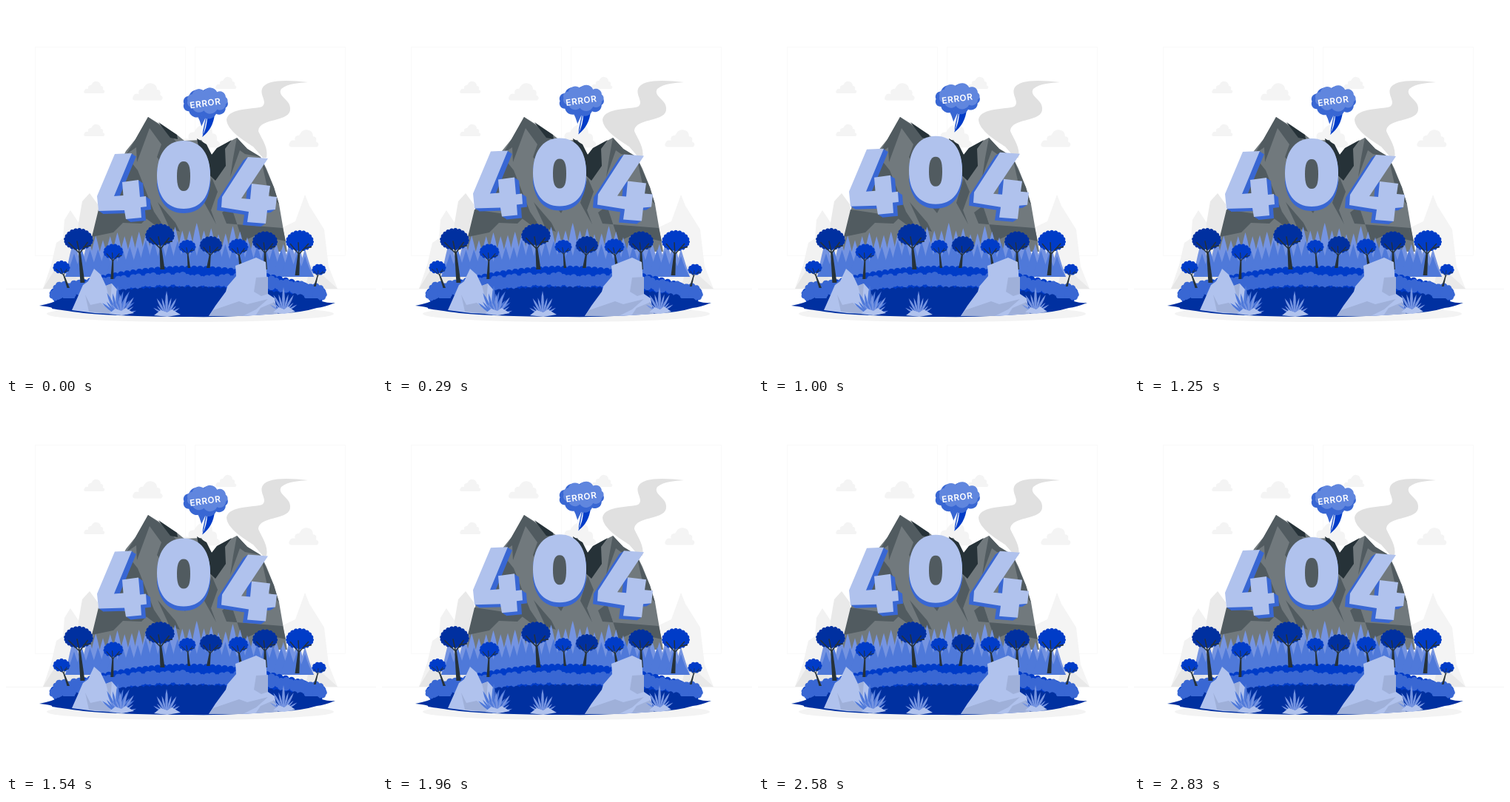
Animation of 500 by 500 pixels, one loop 2870 ms. Source, as an HTML page:

```html
<!DOCTYPE html>
<html lang="en">
<head>
<meta charset="utf-8">
<title>404</title>
<style>
html, body { margin: 0; width: 100%; height: 100%; overflow: hidden; background: #fff }
svg { display: block; width: 100vw; height: 100vh }
text { font: 600 11.8px Inter, Lato, sans-serif; letter-spacing: .6px; fill: #fff }
</style>
</head>
<body>
<svg id="stage" viewBox="0 0 500 500"></svg>
<script>
const BLUE = '#003cc8', NAVY = '#0030a0', MID = '#3967d3', SOFT = '#4f79d9',
      PALE = '#7594e1', LIGHT = '#b0c2ed', SHADE = '#9fb0d9',
      INK = '#263238', STONE = '#515b60', ROCK = '#71797d';

const range = (n, f) => Array.from({ length: n }, (_, i) => f(i));
const path = (d, fill, extra = '') => `<path d="${d}" fill="${fill}" ${extra}/>`;
const poly = (points, fill) => `<polygon points="${points}" fill="${fill}"/>`;

let seed = 7;
const random = () => (seed = seed * 16807 % 2147483647) / 2147483647;

// How far a place lies from the middle of the island, squared: 0 there, 1 at its ends.
const bend = x => ((x - 247) / 185) ** 2;

// Closed clockwise outline whose edges are rows of round bumps.
function bumpy(points, step, fill) {
  let d = `M${points[0]}`;
  points.forEach(([x, y], i) => {
    const [u, v] = points[(i + 1) % points.length];
    const length = Math.hypot(u - x, v - y), n = Math.max(1, Math.round(length / step));
    const r = length / n * 0.58;
    for (let k = 1; k <= n; k++)
      d += `A${r} ${r} 0 0 1 ${x + (u - x) * k / n} ${y + (v - y) * k / n}`;
  });
  return path(d + 'Z', fill);
}

function puff(x, y, rx, ry, n, fill, below = 1) {
  return bumpy(range(n, i => {
    const a = (i + 0.5) / n * 2 * Math.PI, s = Math.sin(a);
    return [x + rx * Math.cos(a), y + ry * s * (s > 0 ? below : 1)];
  }), 99, fill);
}

function tree(x, y, rx, fill, baseX, baseY) {
  const ry = rx * 0.82, w = rx / 9, fx = x + (baseX - x) * 0.3, fy = y + ry;
  const branches = [-0.65, -0.1, 0.6].map(k => `M${fx} ${fy}L${x + rx * k} ${y + ry * 0.2 * Math.abs(k)}`).join('') +
    `M${x + rx * 0.3} ${y + ry * 0.5}l${rx * 0.5} ${-ry * 0.1}`;
  return puff(x, y, rx * 0.9, ry * 0.9, Math.round(rx), fill, 0.75) +
    path(branches, 'none', `stroke="${INK}" stroke-width="${w * 0.65}"`) +
    poly([fx - w * 0.6, fy - 1, fx + w * 0.6, fy - 1, baseX + w * 1.5, baseY, baseX - w * 1.1, baseY], INK);
}

const cloud = (x, y, s) =>
  path('M-12 8Q-15 7-13 4Q-12 1-8 2Q-9-3-4-3Q-1-9 4-8Q9-7 9-2Q13-2 12 3Q16 5 13 8Z', '#f4f4f4',
    `transform="translate(${x} ${y})scale(${s})"`);

const spikes = (n, top, rise, rough, fill) => range(n, i => {
  const x = 92 + 312 * i / (n - 1), y = top + rise * bend(x) + rough * random();
  return path(`M${x - 12} 366Q${x - 6} ${y + 20} ${x} ${y}Q${x + 6} ${y + 20} ${x + 12} 366Z`, fill);
}).join('');

function hedge(x0, x1, top, rise, fill) {
  const points = range(16, i => {
    const x = x0 + (x1 - x0) * i / 15;
    return [x, top + rise * bend(x)];
  });
  return bumpy([...points, [x1 - 10, 402], [x0 + 10, 402]], 8, fill);
}

const bushes = () => range(18, i => {
  const x = 77 + i * 20;
  return puff(x, 368 + 16 * bend(x) + 4 * random(), 13, 7 + 2 * random(), 9, MID);
}).join('');

const plant = (x, y, size, n, fill, lean = 0) => range(n, i => {
  const side = i / (n - 1) * 2 - 1;
  const h = size * (1 - 0.38 * Math.abs(side) - i % 2 * 0.15);
  return path(`M0 0Q${-h * 0.11} ${-h * 0.6} 0 ${-h}Q${h * 0.11} ${-h * 0.6} 0 0`, fill,
    `transform="translate(${x} ${y})rotate(${lean + side * 58})"`);
}).join('');

const pebble = (x, y, w) =>
  poly([x - w, y, x - w / 2, y - 7, x, y - 4, x + w / 3, y - 8, x + w, y - 1, x, y + 2], LIGHT);

const extrude = (d, dx, dy) =>
  range(6, i => path(d, i < 5 ? MID : LIGHT, `transform="translate(${dx * (1 - i / 5)} ${dy * (1 - i / 5)})"`)).join('');

const backdrop = () =>
  path('M39.5 55.5h203v282h-203zM255.5 55.5h203v282h-203z', 'none', 'stroke="#f9f9f9"') +
  path('M0 382.5H500', 'none', 'stroke="#f4f4f4"') +
  poly('50,382 61,350 68,320 77,314 79,289 87,276 103,300 150,382', '#f2f2f2') +
  poly('347,382 372,300 391,291 404,255 410,270 430,302 436,352 448,382', '#f4f4f4') +
  poly('92,382 98,293 103,264 113,253 124,268 140,382', '#e9e9e9') +
  poly('50,382 66,356 90,345 98,382', '#e6e6e6') + poly('404,382 412,350 428,364 448,382', '#e9e9e9') +
  cloud(119, 110, 1) + cloud(191, 116, 1.45) + cloud(119, 168, 1) + cloud(297, 104, 1) +
  cloud(402, 179, 1.43) + cloud(262, 176, 1.9) +
  path('M408 103C380 100 351 99 346 112C343 121 354 130 346 136C334 140 302 137 298 153C298 168 322 182 334 190L347 205H352C355 191 345 179 341 169C342 150 386 158 384 138C384 126 366 122 372 112C380 105 395 104 408 103Z', '#e0e0e0');

const mountain = () =>
  poly('113,332 128,265 162,196 175,180 192,150 231,174 241,182 264,181 278,201 285,192 312,178 326,193 344,204 352,220 362,245 369,268 380,332', ROCK) +
  poly('192,150 175,180 163,200 176,191 177,211 194,165 210,187 204,204 211,214 231,185 219,169', STONE) +
  poly('206,157 231,174 232,180 222,178', INK) +
  poly('258,179 271,187 278,201 285,192 305,181 296,193 297,216 283,236 266,220', INK) +
  poly('312,178 326,193 344,204 323,200 316,195 303,231 307,205', STONE) +
  poly('220,200 252,204 257,251 242,280 224,258', STONE) +
  poly('166,207 178,222 200,278 210,293 204,298 177,278 128,265 160,240', STONE) +
  poly('125,275 192,285 183,294 158,293 145,306 116,312', STONE) +
  poly('205,265 229,293 235,305 221,300', STONE) + poly('278,232 286,251 277,276 284,295 268,266', STONE) +
  poly('304,270 292,279 298,294 374,300 378,318 340,309 320,318', STONE) +
  poly('344,204 362,245 369,268 355,254', STONE);

const floating = () =>
  extrude('M147 200L170 199L146 257L158.500 256L157 238L179 235L181 258L189 257L190 271L182 272L183 286L162 288L160 276L125 277L123 257Z', 6, 4) +
  extrude('M327 204L354 206L318 260L330 261L332 240L357 243L355 257L366 258L364 275L353 276L351 294L326 292L328 278L291 272L292 258Z', -6, 4) +
  extrude('M240 182C264 182 276 201 276 229S263 274 240 274S204 256 204 229S216 182 240 182Z', 0, 6) +
  path('M240 210C233 210 231 218 231 230S233 250 240 250S249 243 249 230S247 210 240 210Z', STONE) +
  path('M258 147Q266 162 266 177L272 148Z', MID) +
  path('M272 149Q272 164 265 177Q280 166 282 146Z', BLUE) +
  path('M270 150L264 163L265 173Z', '#fff') +
  puff(269.500, 132, 29, 16, 9, MID) + puff(272, 128, 26.5, 13.5, 9, '#6086de') +
  '<text transform="translate(249 138.500)rotate(-8)">ERROR</text>';

const land = () =>
  '<ellipse cx="249" cy="416" rx="194" ry="11" fill="#f3f3f3"/>' +
  spikes(33, 292, 32, 16, PALE) + spikes(30, 313, 26, 10, SOFT) +
  hedge(60, 432, 353, 32, BLUE) + bushes() + hedge(66, 426, 381, 16, NAVY) +
  [68, 85, 412, 424].map(x => puff(x, 390, 9, 7, 7, MID)).join('') +
  path('M45 405Q65 401 75 395H421Q427 402 445 401Q430 407 420 408Q400 414 375 415Q310 421 250 420Q160 420 105 415Q75 411 62 409Q65 407 45 405Z', NAVY);

const forest = () =>
  tree(98, 317, 21, NAVY, 103, 374) + tree(145, 333, 14, BLUE, 143, 369) +
  tree(208, 311, 21, NAVY, 211, 356) + tree(245, 326, 12, BLUE, 247, 354) +
  tree(277, 324, 16, NAVY, 273, 354) + tree(314, 326, 14, BLUE, 317, 352) +
  tree(350, 319, 18, NAVY, 350, 356) + tree(397, 319, 20, BLUE, 393, 364) +
  tree(75, 354, 12, BLUE, 84, 381) + tree(423, 357, 10, BLUE, 417, 379);

const foreground = () =>
  poly('89,411 97,393 104,377 111,372 119,355 128,363 135,378 143,375 150,383 153,400 164,417 120,415', LIGHT) +
  poly('107,390 114,404 128,401 145,416 112,413', SHADE) + poly('135,378 143,375 141,401', SHADE) +
  poly('274,419 283,405 297,386 299,379 311,365 310,351 338,340 351,346 354,389 363,395 367,416 320,419', LIGHT) +
  poly('338,367 354,366 354,389 345,392 335,386', SHADE) +
  poly('274,419 280,411 315,399 326,403 354,396 338,410 320,419', SHADE) +
  poly('344,408 363,400 367,416 338,417', SHADE) +
  plant(150, 418, 42, 10, SOFT, 8) + plant(156, 418, 34, 7, PALE, 15) + pebble(156, 416, 17) +
  plant(217, 419, 34, 9, PALE) + pebble(218, 418, 18) +
  plant(375, 415, 35, 9, PALE) + pebble(376, 414, 15);

const stage = document.getElementById('stage');
stage.innerHTML = backdrop() + mountain() + `<g id="float">${floating()}</g>` + land() + forest() + foreground();

const LOOP = 2870, PERIOD = 1500, LIFT = 9.3;
const float = document.getElementById('float');
function draw(now) {
  const phase = now % LOOP % PERIOD / PERIOD;
  const y = -LIFT * (1 - Math.abs(1 - 2 * phase));
  float.setAttribute('transform', `translate(0 ${y.toFixed(2)})`);
  requestAnimationFrame(draw);
}
draw(0);
</script>
</body>
</html>
```
